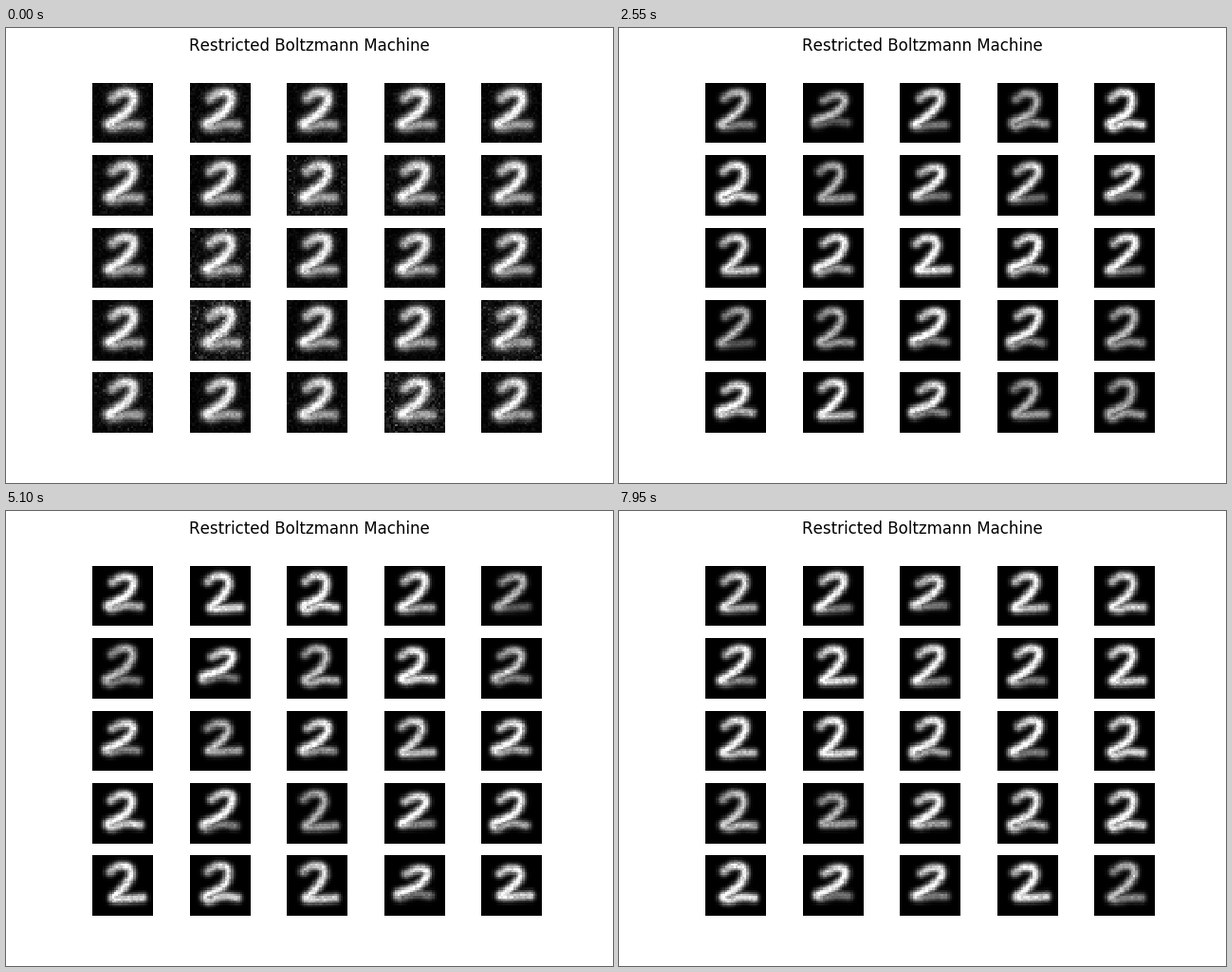
A matplotlib script that plays this animation: 640 px wide and 480 px high, repeating every 8 s.

```python
import numpy as np
import matplotlib.pyplot as plt
from matplotlib.animation import FuncAnimation

plt.rcParams["font.family"] = "DejaVu Sans"
plt.rcParams["text.kerning_factor"] = 6   # whole-pixel letter spacing

INTERVAL, FRAMES, HOLD = 50, 160, 3   # each sample stays for three ticks
SIZE, PANELS = 28, 25

# Two ways to write a 2, as (column, row) points from hook to tail.
PLAIN = np.array([(8, 7.5), (12, 5), (16.5, 5.5), (17.6, 9), (15.5, 13),
                  (12, 17), (8.8, 20), (13, 20.4), (17.5, 20.2), (22.5, 19.8)])
LOOPED = np.array([(8.5, 7.5), (13, 4.8), (17.3, 5.8), (18, 9.5), (16, 14),
                   (11.5, 16.8), (7.2, 18.8), (8.5, 21.2), (15, 18.8), (22, 19.8)])

# Each trait of each panel drifts on its own slow sine.
TRAITS = ("lean", "loop", "squat", "slide", "light")
rng = np.random.default_rng(7)
phase = rng.uniform(0, 2 * np.pi, (len(TRAITS), PANELS))
speed = rng.uniform(.12, .3, (len(TRAITS), PANELS))
noise_level = .03 + .08 * rng.uniform(0, 1, PANELS)**3


def spline_weights(count, samples=55):
    """Matrix that turns control points into a Catmull-Rom curve."""
    eye = np.eye(count)
    padded = np.vstack([2 * eye[0] - eye[1], eye, 2 * eye[-1] - eye[-2]])
    t = np.linspace(0, count - 1, samples)
    i = np.minimum(t.astype(int), count - 2)
    u = (t - i)[:, None]
    a, b, c, d = (padded[i + k] for k in range(4))
    return .5 * (2 * b + (c - a) * u + (2 * a - 5 * b + 4 * c - d) * u**2
                 + (3 * b - a - 3 * c + d) * u**3)


CURVE = spline_weights(len(PLAIN))
ALONG = np.linspace(0, 1, len(CURVE))
ROWS, COLS = np.mgrid[:SIZE, :SIZE].reshape(2, -1, 1) + .5


def traits_at(step, youth):
    """Every chain starts from the same leaning digit and wanders off."""
    lean, loop, squat, slide, light = np.sin(phase + speed * step)
    wander = np.array([.35 + .5 * lean,
                       np.clip(.4 + .6 * loop, 0, 1),
                       (.5 + .5 * squat)**3,
                       .4 * slide,
                       .95 - .3 * (.5 + .5 * light)**6])
    start = np.array([[.5], [.4], [0], [.4], [.92]])
    return (youth * start + (1 - youth) * wander).T


def digit_curve(lean, loop, squat, slide):
    x, y = (CURVE @ (PLAIN + loop * (LOOPED - PLAIN))).T
    x = x + slide + .28 * lean * (13 - y)
    return x, 13.3 + (y - 13.3) * (1 - .2 * squat)


def draw_digit(traits, level, youth, noise):
    lean, loop, squat, slide, light = traits
    x, y = digit_curve(lean, loop, squat, slide)
    tail = .85 - .45 * max(lean, 0)
    glow = light * np.interp(ALONG, [0, .2, .65, .8, 1], [.7, .95, 1, tail, tail])
    dist2 = (COLS - x)**2 + (ROWS - y)**2
    width = 1.55 + .25 * youth
    stroke = (glow * np.exp(-dist2 / (2 * width**2))).max(axis=1)
    halo = .07 * np.exp(-dist2.min(axis=1) / 14)
    ink = np.maximum(1.1 * stroke, halo)
    ink *= 1 + noise.normal(0, .07, SIZE**2)
    ink += youth * level * noise.gamma(2, .5, SIZE**2) * (1 - stroke)
    ink += youth * level * noise.normal(0, .8, SIZE**2) * stroke
    return np.clip(ink - .01, 0, 1).reshape(SIZE, SIZE)


fig, axes = plt.subplots(5, 5, figsize=(6.4, 4.8), dpi=100)
fig.suptitle("Restricted Boltzmann Machine", fontsize=12)
images = []
for ax in axes.flat:
    ax.axis("off")
    images.append(ax.imshow(np.zeros((SIZE, SIZE)), cmap="gray", vmin=0, vmax=1,
                            interpolation="nearest"))


def update(frame):
    step = frame // HOLD
    youth = np.exp(-step / 4)
    noise = np.random.default_rng(100 + step)
    for image, traits, level in zip(images, traits_at(step, youth), noise_level):
        image.set_data(draw_digit(traits, level, youth, noise))
    return images


anim = FuncAnimation(fig, update, frames=FRAMES, interval=INTERVAL,
                     repeat=True, repeat_delay=0)
plt.show()
```
